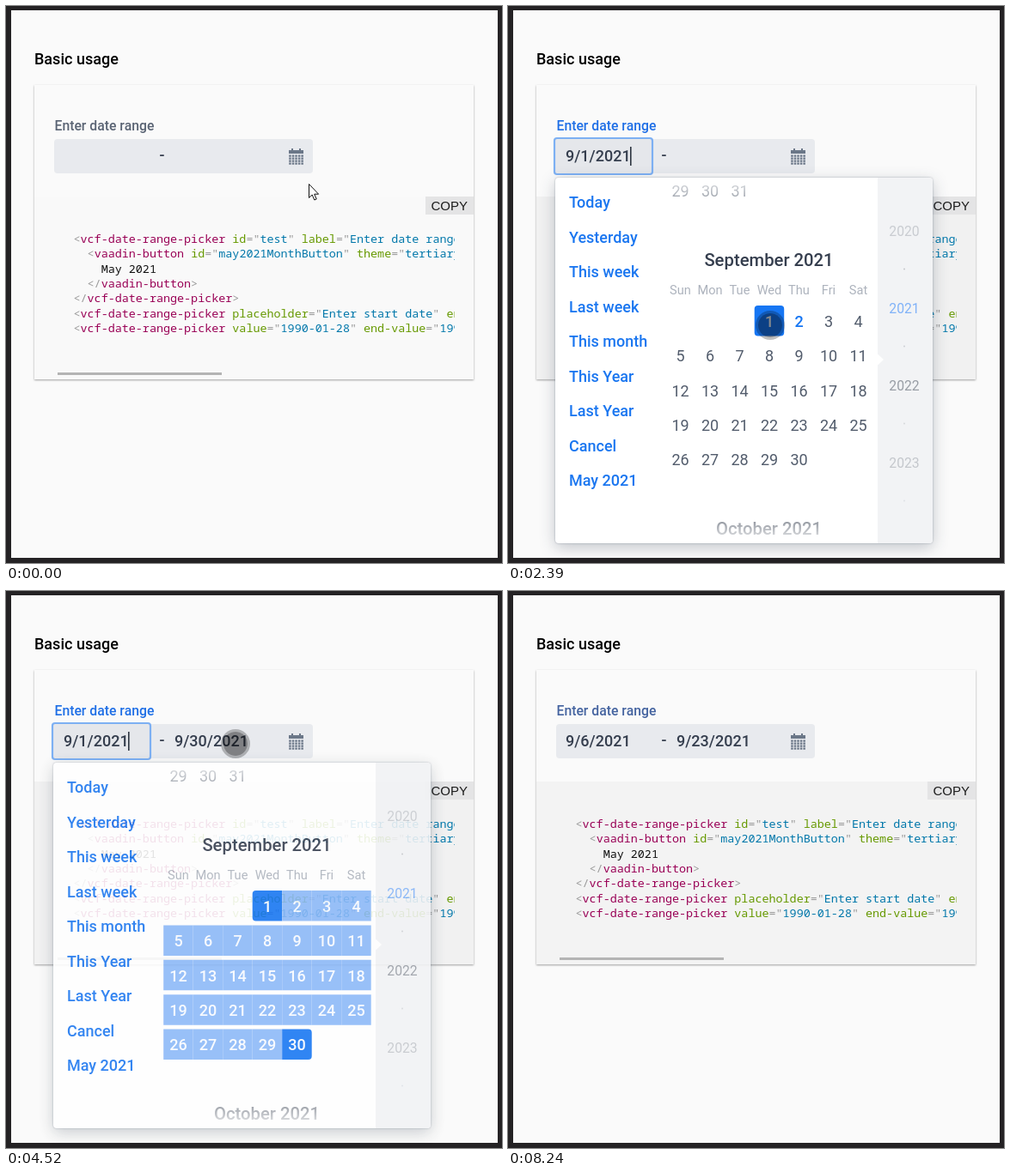
Write an HTML page that moves like this. It is 577x649 px and loops after 8.34 s.

```html
<!DOCTYPE html>
<html lang="en">
<head>
<meta charset="utf-8">
<title>Date range picker</title>
<style>
  html, body { margin: 0; width: 100%; height: 100%; overflow: hidden; background: #242224; }
  svg { display: block; width: 577px; height: 649px; }
  text { font: 500 18px Roboto, sans-serif; fill: #353e4e; white-space: pre; }
  .mid { text-anchor: middle; }
  .title { fill: #000; }
  .label { font-size: 15.75px; }
  .card { filter: drop-shadow(0 1px 1.2px rgba(0,0,0,.36)); }
  .code text { font: 400 13.4px "Noto Sans Mono", "DejaVu Sans Mono", monospace; fill: #111; }
  .code .p { fill: #999; }
  .code .t { fill: #905; }
  .code .a { fill: #690; }
  .code .s { fill: #07a; }
  .copy { font: 400 15px "Liberation Sans", Arial, sans-serif; fill: #1c1c1c; }
  .panel { filter: drop-shadow(0 0 1px rgba(20,35,60,.3)) drop-shadow(0 5px 9px rgba(20,35,60,.24)); }
  .menu text { fill: #1a76f0; }
  .month { font-size: 20.25px; }
  .week { font-size: 14.6px; font-weight: 400; fill: #adb3bd; }
  .day { font-weight: 400; fill: #525c6c; }
  .year { font-size: 15.75px; font-weight: 400; }
</style>
</head>
<body>
<svg id="stage" viewBox="0 0 577 649">
  <defs>
    <clipPath id="codeClip"><rect x="60" y="250" width="462" height="150"/></clipPath>
    <linearGradient id="fade" x2="0" y2="1">
      <stop offset="0" stop-color="#fff" stop-opacity=".9"/>
      <stop offset=".11" stop-color="#fff" stop-opacity="0"/>
      <stop offset=".88" stop-color="#fff" stop-opacity="0"/>
      <stop offset="1" stop-color="#fff" stop-opacity=".95"/>
    </linearGradient>
  </defs>
  <rect x="6" y="5" width="566" height="638" fill="#fafafa"/>
  <text class="title" x="33" y="68">Basic usage</text>

  <rect class="card" x="33" y="92" width="511" height="343" fill="#fafafa"/>
  <rect id="codeBg" x="33" y="222" width="511" height="213"/>
  <rect x="488" y="222" width="56" height="21" fill="#e4e4e5"/>
  <text class="copy" x="494.5" y="238">COPY</text>
  <g id="code" class="code" clip-path="url(#codeClip)"></g>
  <rect x="60" y="427" width="191" height="3" fill="#b4b4b4"/>

  <text id="label" class="label" x="56.5" y="145">Enter date range</text>
  <rect x="56" y="155" width="301" height="40" rx="4" fill="#e8eaee"/>
  <rect id="ring" x="54" y="154" width="114" height="42" rx="3" fill="#e5e7eb" stroke="#7db0f3" stroke-width="2.2"/>
  <text id="start" x="67" y="181"></text>
  <text x="178.5" y="180" fill="#222">-</text>
  <text id="end" x="196" y="181"></text>
  <rect id="caret" y="164" width="1.6" height="22" fill="#2c3440"/>
  <path id="icon" fill="#6b7788"/>

  <g id="popup">
    <rect class="panel" x="55" y="200" width="439" height="426" rx="4" fill="#fff"/>
    <path d="M430 200H490a4 4 0 0 1 4 4V622a4 4 0 0 1-4 4H430Z" fill="#f2f3f5"/>
    <path d="M429.5 405L437 412L429.5 419Z" fill="#fff"/>
    <g id="menu" class="menu"></g>
    <g id="cells"></g>
    <g id="grid"></g>
    <rect x="178" y="200" width="252" height="426" fill="url(#fade)"/>
    <g id="years"></g>
  </g>

  <path id="arrow" d="M352.5 207.5V223.5L356.2 220L358.8 226L361.2 225L358.7 219.2H363.6Z" fill="#fff" stroke="#111"/>
  <g id="touch">
    <circle r="14" fill="#000" fill-opacity=".45"/>
    <circle r="15.5" fill="none" stroke="#000" stroke-opacity=".25" stroke-width="3"/>
  </g>
</svg>
<script>
const LOOP = 8340;
const $ = id => document.getElementById(id);

function add(parent, tag, attrs, text) {
  const el = document.createElementNS('http://www.w3.org/2000/svg', tag);
  for (const k in attrs) el.setAttribute(k, attrs[k]);
  if (text !== undefined) el.textContent = text;
  parent.appendChild(el);
  return el;
}

// Code sample
const source = [
  '<vcf-date-range-picker id="test" label="Enter date range">',
  '  <vaadin-button id="may2021MonthButton" theme="tertiary">',
  '    May 2021',
  '  </vaadin-button>',
  '</vcf-date-range-picker>',
  '<vcf-date-range-picker placeholder="Enter start date" end-placeholder="">',
  '<vcf-date-range-picker value="1990-01-28" end-value="1990-02-10">'
];
source.forEach((line, i) => {
  const row = add($('code'), 'text', { x: 78.5, y: 276 + 17.35 * i });
  const tokens = /(<\/?)([\w-]+)|([\w-]+)(=")([^"]*)(")|(>)|([^<>]+?(?=<|$)|\s+)/g;
  const kinds = ['p', 't', 'a', 'p', 's', 'p', 'p', ''];
  for (const m of line.matchAll(tokens))
    kinds.forEach((k, j) => m[j + 1] && add(row, 'tspan', { class: k }, m[j + 1]));
});

// Calendar icon
let icon = 'M329 168h3v-2h2v2h7v-2h2v2h3v4h-17z';
for (let r = 0; r < 4; r++)
  for (let c = 0; c < 5; c++) icon += `M${329.2 + 3.55 * c} ${173.6 + 3 * r}h2.5v2.1h-2.5z`;
$('icon').setAttribute('d', icon);

// Popup contents
['Today', 'Yesterday', 'This week', 'Last week', 'This month', 'This Year', 'Last Year', 'Cancel', 'May 2021']
  .forEach((name, i) => add($('menu'), 'text', { x: 71, y: 235.3 + 40.5 * i }, name));

const colX = c => 200.5 + 34.5 * c;
const mid = (cls, x, y, text) => add($('grid'), 'text', { class: 'mid ' + cls, x, y }, text);
[29, 30, 31].forEach((d, c) => mid('day', colX(c), 222.3, d));
mid('month', 303.5, 303, 'September 2021');
mid('month', 303.5, 616, 'October 2021');
'Sun Mon Tue Wed Thu Fri Sat'.split(' ').forEach((d, c) => mid('week', colX(c), 335.5, d));

const days = [];
for (let d = 1; d <= 30; d++) {
  const c = (d + 2) % 7, r = Math.floor((d + 2) / 7);
  days[d] = {
    cell: add($('cells'), 'path', {}),
    text: mid('day', colX(c), 373.7 + 40.4 * r, d),
    x: 183.2 + 34.5 * c, y: 349 + 40.4 * r
  };
}

[[2020, '#c9ccd1'], [2021, '#80b2f8'], [2022, '#989da5'], [2023, '#c4c7cc']].forEach(([y, fill], i) => {
  add($('years'), 'text', { class: 'mid year', x: 461, y: 268 + 90 * i, style: 'fill:' + fill }, y);
  add($('years'), 'circle', { cx: 461, cy: 306.5 + 90 * i, r: 1, fill: '#c4c7cc', opacity: 1 - i * .2 });
});

function cellPath({ x, y }, left, right) {
  const w = 34.5, h = 35.5, a = left ? 4 : 0, b = right ? 4 : 0;
  return `M${x + a} ${y}H${x + w - b}q${b} 0 ${b} ${b}V${y + h - b}q0 ${b} ${-b} ${b}` +
    `H${x + a}q${-a} 0 ${-a} ${-a}V${y + a}q0 ${-a} ${a} ${-a}Z`;
}

let shown = '';
function select(from, to) {
  const key = from + ':' + to;
  if (key === shown) return;
  shown = key;
  for (let d = 1; d <= 30; d++) {
    const { cell, text } = days[d];
    const edge = d === from || d === to, within = from && d >= from && d <= to;
    cell.setAttribute('d', cellPath(days[d], d === from, d === to || (d === from && !to)));
    cell.setAttribute('fill', edge ? '#1676f3' : within ? '#8cb9f8' : 'none');
    text.style.fill = edge || within ? '#f8fbff' : d === 2 ? '#1676f3' : '';
    text.style.fontWeight = edge || within || d === 2 ? 500 : 400;
  }
}

// Timelines: [time, value...]
const ranges = [[0, 0, 0], [2390, 1, 0], [3320, 1, 30], [5660, 6, 30], [6350, 6, 23]];
const codeBg = [[0, '#f9f9f9'], [1090, '#f1f1f1'], [3320, '#f8f8f8'], [4430, '#f1f1f1'], [6350, '#f3f3f3']];
const caret = [[0, 0], [1090, 1], [1590, 0], [2090, 1], [2590, 0], [3650, 1], [4150, 0], [4430, 1], [4790, 0],
  [5290, 1], [6080, 0], [6490, 1], [6990, 0], [7490, 1], [7990, 0]];
const path = [[320, 352, 207], [870, 117, 170], [1440, 117, 170], [2160, 305, 372], [2420, 305, 372],
  [3030, 340, 519], [3630, 340, 519], [4150, 267, 178], [4560, 267, 178], [5230, 292, 446], [5350, 240, 434],
  [5600, 240, 434], [5680, 236, 416], [5900, 331, 485], [6530, 331, 485], [7130, 231, 365], [7190, 220, 373]];

const latest = (list, t) => list.findLast(k => k[0] <= t);
const ramp = (t, from, to) => Math.min(1, Math.max(0, (t - from) / (to - from)));

function pointer(t) {
  const i = path.findIndex(k => k[0] > t);
  if (i < 1) return path[i ? path.length - 1 : 0].slice(1);
  const [t0, x0, y0] = path[i - 1], [t1, x1, y1] = path[i];
  const p = ramp(t, t0, t1), e = p * p * (3 - 2 * p);
  return [x0 + (x1 - x0) * e, y0 + (y1 - y0) * e];
}

function popupOpacity(t) {
  if (t < 3320) return ramp(t, 1090, 1195);
  if (t < 3380) return .12;
  if (t < 6350) return ramp(t, 4430, 4533);
  return t < 6400 ? .12 : 0;
}

const show = (id, on) => $(id).setAttribute('visibility', on ? 'visible' : 'hidden');
const date = d => d ? `9/${d}/2021` : '';

function draw(t) {
  const [, from, to] = latest(ranges, t);
  const focused = t >= 1090 && t < 8180;
  $('codeBg').setAttribute('fill', latest(codeBg, t)[1]);
  $('label').style.fill = focused ? '#1f6fe6' : t < 1090 ? '#5a6474' : '#4564a0';
  show('ring', focused);
  $('start').textContent = date(from);
  $('end').textContent = date(to);
  show('caret', latest(caret, t)[1]);
  $('caret').setAttribute('x', from ? 142 : 66.7);
  select(from, to);
  $('popup').setAttribute('opacity', popupOpacity(t));
  show('arrow', t < 320);
  show('touch', t >= 320 && t < 7250);
  $('touch').setAttribute('transform', `translate(${pointer(t)})`);
}

function tick() {
  draw(performance.now() % LOOP);
  requestAnimationFrame(tick);
}
tick();
</script>
</body>
</html>
```
